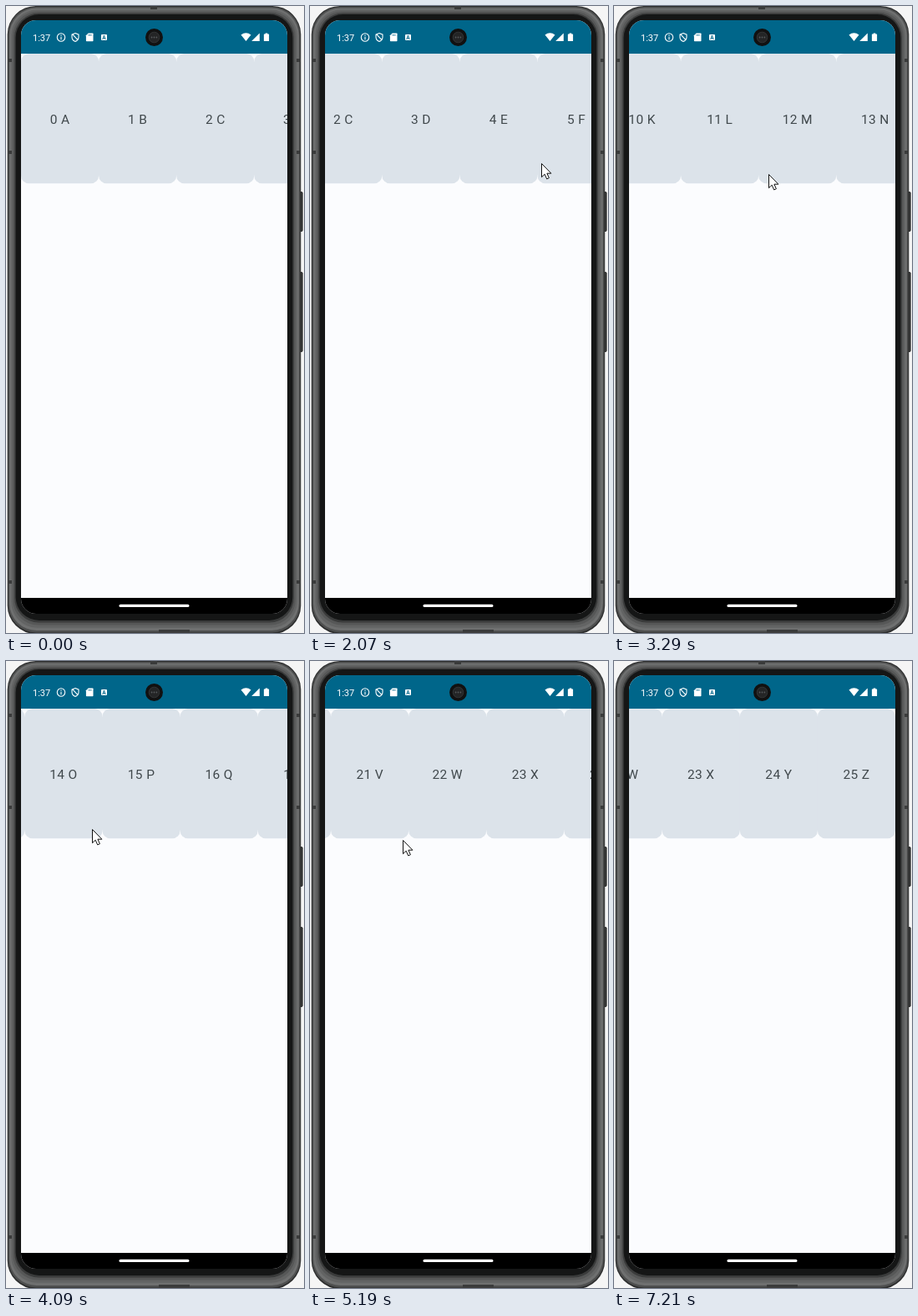
An HTML page for the animation above (8200 ms loop, 357 by 750 pixels).

```html
<!DOCTYPE html>
<html lang="en">
<head>
<meta charset="utf-8">
<title>Horizontal card list</title>
<style>
  html, body { margin: 0; width: 100%; height: 100%; overflow: hidden; background: #f5f5f5; }
  svg { display: block; width: 357px; height: 750px; }
  text { font-family: Roboto, sans-serif; }
  .label { font-size: 15.5px; letter-spacing: .35px; text-anchor: middle; fill: #40484c; }
</style>
</head>
<body>
<svg viewBox="0 0 357 750">
  <defs>
    <clipPath id="screenClip"><rect x="18" y="17" width="319" height="710" rx="18"/></clipPath>
  </defs>

  <!-- side buttons -->
  <g fill="#3a3b3b" stroke="#1c1c1c" stroke-width=".8">
    <rect x="351" y="222.5" width="4.2" height="47" rx="1"/>
    <rect x="351" y="318.5" width="4.2" height="95" rx="1"/>
  </g>

  <g id="body"></g>
  <g fill="#3a3b3b">
    <rect x="2" y="63" width="5" height="4"/>
    <rect x="2" y="173" width="5" height="4"/>
    <rect x="2" y="687" width="5" height="4"/>
    <rect x="348" y="63" width="5" height="4"/>
    <rect x="348" y="173" width="5" height="4"/>
    <rect x="348" y="687" width="5" height="4"/>
    <rect x="173" y="0" width="8" height="4"/>
    <rect x="183" y="746" width="37" height="3"/>
  </g>

  <!-- screen -->
  <g clip-path="url(#screenClip)">
    <rect x="18" y="17" width="319" height="710" fill="#fbfcfe"/>
    <g id="list"></g>
    <rect x="18" y="17" width="319" height="40" fill="#00668a"/>
    <rect x="18" y="708" width="319" height="19" fill="#000"/>
  </g>
  <rect x="135.5" y="715.8" width="84" height="3.2" rx="1.6" fill="#fff"/>

  <!-- status bar -->
  <text x="32" y="41.6" font-size="11" fill="#fff">1:37</text>
  <g fill="none" stroke="#fff" stroke-width="1.1">
    <circle cx="66" cy="37.5" r="4.7"/>
    <path d="M66 36.8v3.4M66 34.6v1.2"/>
    <path d="M83 32.6l4 1.6v3q0 3.6-4 5.2q-4-1.6-4-5.2v-3zM80 34.2l6 6.4"/>
  </g>
  <g fill="#fff">
    <path d="M98.6 32.6h5.2q.7 0 .7.7v8.2q0 .7-.7.7h-7.2q-.7 0-.7-.7v-6.2z"/>
    <rect x="114" y="34" width="7" height="7" rx="1"/>
    <path d="M281.5 34.6q6-4.6 12 0l-6 7.4z"/>
    <path d="M303.8 32.4v9.6h-9.6z"/>
    <path d="M310.7 32.4h2.6v1h1.2q.6 0 .6.6v7.4q0 .6-.6.6h-5q-.6 0-.6-.6v-7.4q0-.6.6-.6h1.2z"/>
  </g>
  <path d="M98.9 34v1.6M100.5 34v1.6M102.1 34v1.6" stroke="#00668a" stroke-width=".8"/>
  <text x="117.5" y="39.8" font-size="6.5" font-weight="700" text-anchor="middle" fill="#00668a">A</text>

  <!-- camera -->
  <circle cx="177.5" cy="37.5" r="10.5" fill="#111"/>
  <circle cx="177.5" cy="37.5" r="6.3" fill="#242526" stroke="#333536"/>
  <g fill="#55595b">
    <circle cx="174.6" cy="37.5" r=".9"/>
    <circle cx="177.5" cy="37.5" r=".9"/>
    <circle cx="180.4" cy="37.5" r=".9"/>
  </g>

  <path id="cursor" d="M.5 .5v16.2l3.7-3.5 2.5 5.7 2.7-1.2-2.5-5.5h5z"
        fill="#fff" stroke="#111" stroke-linejoin="round"/>
</svg>
<script>
const LOOP = 8200, STEP = 60;
const LEFT = 18, RIGHT = 337, PITCH = 93.1, COUNT = 26;
const END = COUNT * PITCH - (RIGHT - LEFT);
const CARD = "#dce3ea";
const body = document.getElementById("body");
const list = document.getElementById("list");
const cursor = document.getElementById("cursor");

const ease = {
  lin: u => u,
  in: u => u * u,
  out: u => 1 - (1 - u) * (1 - u),
  soft: u => u * u * (3 - 2 * u)
};

// Metal rim from the outside in: [inset, colour]
const rim = [
  [0, "#2c2d2d"], [1, "#4e4f4f"], [2.5, "#6f7070"], [4.5, "#636464"],
  [6.5, "#565757"], [8.5, "#3a3b3b"], [10, "#151616"]
];

// Times at which the stepped clock restarts
const ticks = [1030, 2070, 3290, 4090, 5190, 6070];

// [time, x, y, easing towards this point]
const pointer = [
  [1030, 343, 196], [1210, 296, 190, "out"], [1300, 290, 192, "lin"],
  [1700, 130, 216, "soft"], [2070, 277, 188, "soft"], [2130, 279, 188, "lin"],
  [2400, 140, 191, "in"], [2560, 128, 193, "out"], [3000, 285, 195, "soft"],
  [3090, 285, 195, "lin"], [3290, 185, 201, "in"], [3410, 110, 201, "lin"],
  [3780, 270, 192, "soft"], [3880, 270, 192, "lin"], [4090, 103, 201, "in"],
  [4230, 92, 212, "out"], [4680, 280, 192, "soft"], [4780, 280, 192, "lin"],
  [5190, 111, 214, "in"], [5300, 106, 216, "out"], [5700, 285, 189, "soft"],
  [5850, 285, 189, "lin"], [6070, 216, 194, "in"], [6190, 160, 200, "lin"],
  [6610, 329, 652, "in"]
];

// [time, offset, easing]: drags speed up, flings slow down
const scroll = [
  [1300, 0], [1700, 160, "soft"], [2070, 211, "out"], [2130, 211, "lin"],
  [2400, 350, "in"], [3090, 862, "out"], [3290, 962, "in"], [3410, 1037, "lin"],
  [3880, 1132, "out"], [4090, 1299, "in"], [4780, 1779, "out"],
  [5190, 1948, "in"], [5520, END, "out"]
];

const stretch = [
  [5850, 1], [6070, 1.0143, "in"], [6190, 1.024, "lin"], [6850, 1, "out"]
];

function sample(track, t, col = 1) {
  const i = track.findIndex(key => key[0] > t);
  if (i === 0) return track[0][col];
  if (i < 0) return track[track.length - 1][col];
  const a = track[i - 1], b = track[i];
  const u = ease[b[b.length - 1]]((t - a[0]) / (b[0] - a[0]));
  return a[col] + (b[col] - a[col]) * u;
}

function add(parent, name, attrs, label = "") {
  const el = document.createElementNS("http://www.w3.org/2000/svg", name);
  for (const key in attrs) el.setAttribute(key, attrs[key]);
  el.textContent = label;
  parent.append(el);
}

// The rim is thicker along the bottom edge
for (const [d, fill] of rim) {
  add(body, "rect", {
    x: 1.7 + d, y: d, width: 351.6 - 2 * d, height: 751 - 2.6 * d, rx: 34 - d * .6, fill
  });
}

// Fills the hairline seams between neighbouring cards
add(list, "rect", { x: LEFT + 10, y: 67, width: COUNT * PITCH - 20, height: 135, fill: CARD });
for (let i = 0; i < COUNT; i++) {
  const x = LEFT + i * PITCH;
  add(list, "rect", { x, y: 57, width: PITCH, height: 155.2, rx: 9.3, fill: CARD });
  add(list, "text", { x: x + PITCH / 2, y: 141, class: "label" },
    `${i} ${String.fromCharCode(65 + i)}`);
}

function stepped(t) {
  const start = ticks.filter(tick => tick <= t).pop();
  return start === undefined ? 0 : start + Math.floor((t - start) / STEP) * STEP;
}

function draw(now) {
  const t = stepped(now % LOOP);
  const k = sample(stretch, t);
  list.setAttribute("transform",
    `translate(${RIGHT * (1 - k)} 0) scale(${k} 1) translate(${-sample(scroll, t)} 0)`);
  cursor.setAttribute("transform", `translate(${sample(pointer, t)} ${sample(pointer, t, 2)})`);
  cursor.setAttribute("visibility", t >= 1030 && t < 6660 ? "visible" : "hidden");
}

function frame() {
  draw(performance.now());
  requestAnimationFrame(frame);
}
frame();
</script>
</body>
</html>
```
